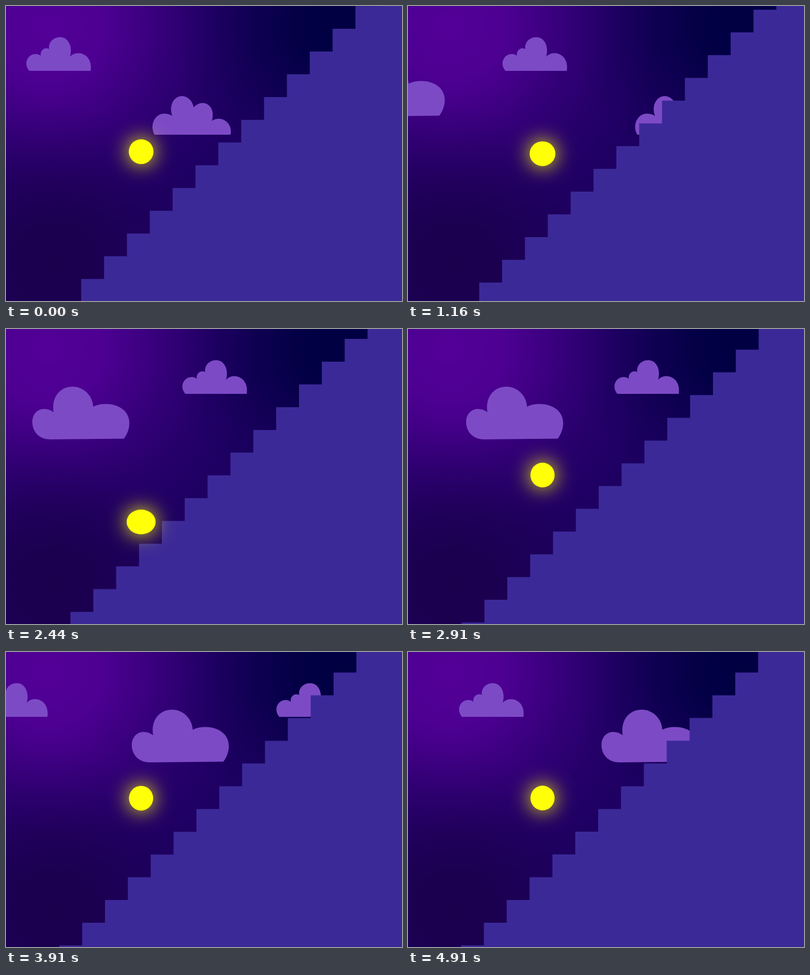
An HTML page with a canvas that plays this animation: 800 px wide and 596 px high, repeating every 4.93 s.

```html
<!DOCTYPE html>
<html lang="en">
<head>
<meta charset="utf-8">
<title>Climbing ball</title>
<style>
  html, body { margin: 0; width: 100%; height: 100%; overflow: hidden; background: #1e0062; }
  canvas { display: block; }
</style>
</head>
<body>
<canvas width="800" height="596"></canvas>
<script>
const ctx = document.querySelector('canvas').getContext('2d');
const W = 800, H = 596, LOOP = 4930;

const small = new Path2D('M6 131C-7 116 3 97 19 97C23 97 26 98 29 101C27 91 36 82 46 87C44 74 54 63 68 63C86 63 94 84 88 103C101 87 135 96 130 131Z');
const medium = new Path2D('M5 260C-6 240 6 217 25 217.5C31 217.5 36 219 41 222C33 202 44 182 60 182C72 182 82 192 84 205C100 186 130 198 121 232C138 220 164 235 158.5 260Z');
const large = new Path2D('M36 223C14 223 0 207 0 188C0 163 24 154 43 168C38 138 56 116.5 81 116.5C104 116.5 122 135 123 157C150 144 196 154 196 190C196 202 191 214 185 221.5Z');

// start: left edge at time 0, speed in px/s
const clouds = [
  { shape: small, start: 41, speed: 129.2 },
  { shape: small, start: -631, speed: 149.5 },
  { shape: medium, start: 295, speed: 140.5 },
  { shape: large, start: -280.5, speed: 136.7 },
];

function glow(x, y, r, rgb) {
  const g = ctx.createRadialGradient(x, y, 0, x, y, r);
  for (const [stop, alpha] of [[0, 1], [0.25, 0.9], [0.6, 0.36], [0.8, 0.12], [1, 0]])
    g.addColorStop(stop, `rgba(${rgb},${alpha})`);
  ctx.fillStyle = g;
  ctx.fillRect(0, 0, W, H);
}

function drawSky() {
  ctx.fillStyle = 'rgb(30,0,98)';
  ctx.fillRect(0, 0, W, H);
  glow(85, 40, 420, '83,0,152');
  glow(670, 40, 340, '0,0,66');
  glow(95, 520, 320, '27,0,78');
}

function drawClouds(t) {
  ctx.fillStyle = '#7d4ac6';
  for (const { shape, start, speed } of clouds) {
    ctx.save();
    ctx.translate(start + speed * t, 0);
    ctx.fill(shape);
    ctx.restore();
  }
}

function drawStairs(t) {
  ctx.fillStyle = '#3c2998';
  ctx.beginPath();
  ctx.moveTo(W, H + 60);
  for (let i = -2; i < 21; i++) {
    const x = 152 - 46.75 * t + 46.17 * i;
    const y = 551.5 + 45.85 * t - 45.95 * i;
    ctx.lineTo(x, y + 45.95);
    ctx.lineTo(x, y);
  }
  ctx.lineTo(W + 100, -100);
  ctx.lineTo(W + 100, H + 60);
  ctx.fill();
}

// Two bounces every two seconds, landing slightly early, then slightly late
function ballDrop(t) {
  const p = t % 1, land = t % 2 < 1 ? 0.477 : 0.56;
  return 118 * (p < land ? (p / land) ** 2.7 : ((1 - p) / (1 - land)) ** 2.9);
}

function ballX(t) {
  const p = t % 2;
  if (p < 0.477) return 273;
  return p < 1 ? 273 - 1.5 * (p - 0.477) / 0.523 : 271.5 + 1.5 * (p - 1);
}

// Widens on the way down, springs narrow off the step
function ballWidth(t) {
  const u = (t + 0.5) % 1 - 0.5;
  return 50 + (12 * u + 38 * u ** 3) * Math.min(1, (0.5 - Math.abs(u)) / 0.05);
}

function drawBall(t) {
  ctx.save();
  ctx.shadowColor = ctx.fillStyle = '#ffff08';
  ctx.shadowBlur = 40;
  ctx.beginPath();
  ctx.ellipse(ballX(t), 294.3 + ballDrop(t), ballWidth(t) / 2, 25, 0, 0, 2 * Math.PI);
  ctx.fill();
  ctx.restore();
}

function frame() {
  const t = performance.now() % LOOP / 1000;
  drawSky();
  drawClouds(t);
  drawStairs(t);
  drawBall(t);
  requestAnimationFrame(frame);
}
frame();
</script>
</body>
</html>
```
